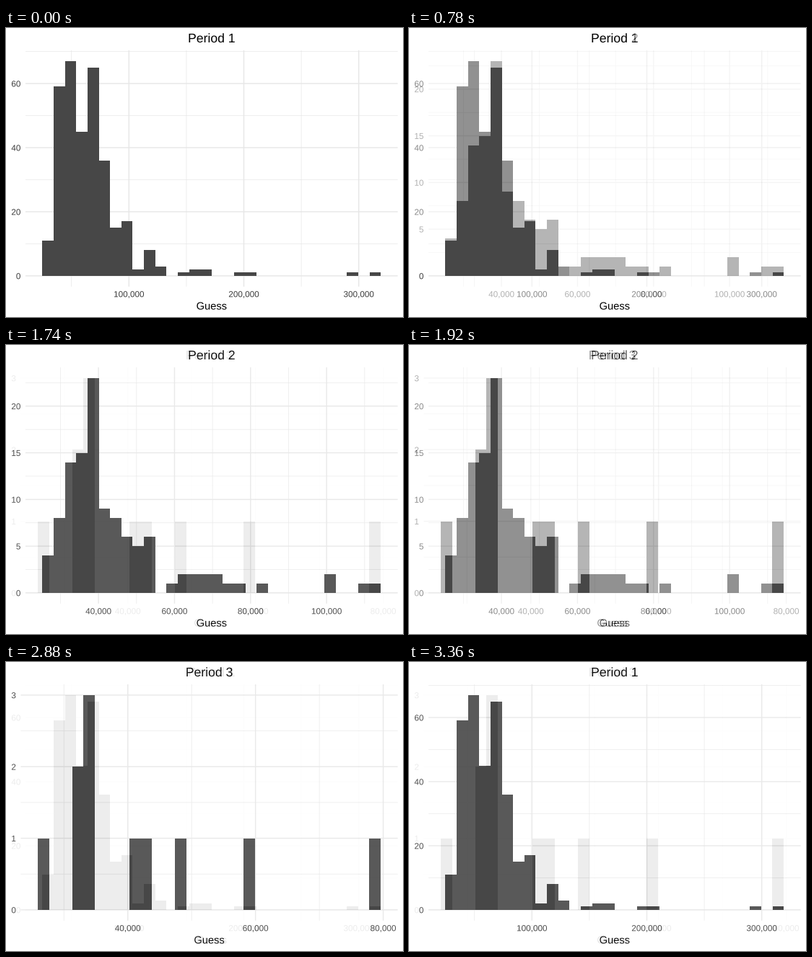
Recreate the animation shown at these times as a matplotlib script. Size 550 px wide and 401 px high, loop 3.42 s.

```python
import matplotlib.pyplot as plt
import numpy as np
from matplotlib.animation import FuncAnimation
from matplotlib.patches import PathPatch
from matplotlib.textpath import TextPath
from matplotlib.transforms import Affine2D

WIDTH, HEIGHT, DPI = 550, 401, 96
TOP, BOTTOM, RIGHT = 31.0, 358.8, 542.67
BASE, PEAK = 343.9, 45.9  # y of zero and of the tallest bar
BINS = 30
BAR, GRID, LABEL = "#474747", "#e7e7e7", "#3c3c3c"
STEP_MS, HOLD, FADE = 60, 9, 10

# Advance widths in em; every other glyph used is 0.556
ADVANCE = {",": .278, " ": .278, "P": .667, "r": .333,
           "i": .222, "G": .778, "s": .5}

# Bars as {bin: count}; x ticks as (first px, gap px, first value, gap value)
PERIODS = [
    dict(title="Period 1", left=26.98, xticks=(170.3, 159.2, 100000, 100000),
         ygap=20,
         bars=dict(enumerate([11, 59, 67, 45, 65, 36, 15, 17, 2, 8, 3]))
         | {12: 1, 13: 2, 14: 2, 17: 1, 18: 1, 27: 1, 29: 1}),
    dict(title="Period 2", left=26.98, xticks=(128.1, 105.35, 40000, 20000),
         ygap=5,
         bars=dict(enumerate([4, 8, 14, 15, 23, 9, 8, 6, 5, 6]))
         | {11: 1, 12: 2, 13: 2, 14: 2, 15: 2, 16: 1, 17: 1, 19: 1,
            25: 2, 28: 1, 29: 1}),
    dict(title="Period 3", left=20.46, xticks=(168.7, 176.95, 40000, 20000),
         ygap=1,
         bars={0: 1, 3: 2, 4: 3, 8: 1, 9: 1, 12: 1, 18: 1, 29: 1}),
]

fig = plt.figure(figsize=(WIDTH / DPI, HEIGHT / DPI), dpi=DPI,
                 facecolor="white")


def put_text(ax, x, y, text, points, color, align=0.5):
    """Draw text as outlines, so it keeps its subpixel place; y is the baseline."""
    size = points * DPI / 72
    width = sum(ADVANCE.get(c, .556) for c in text) * size
    path = TextPath((0, 0), text, size=size, prop={"family": "Liberation Sans"})
    place = Affine2D().scale(1, -1).translate(x - align * width, y)
    ax.add_patch(PathPatch(place.transform_path(path), color=color, lw=0,
                           snap=False, zorder=4))


def grid_lines(ax, left, xs, ys, width):
    style = dict(color=GRID, lw=width, solid_capstyle="butt", snap=False,
                 zorder=1)
    for x in xs:
        if left < x < RIGHT:
            ax.plot([x, x], [TOP, BOTTOM], **style)
    for y in ys:
        if TOP < y < BOTTOM:
            ax.plot([left, RIGHT], [y, y], **style)


def draw_histogram(ax, title, left, xticks, ygap, bars):
    x0, dx, value, dvalue = xticks
    counts = np.array([bars.get(i, 0) for i in range(BINS)])
    unit = (BASE - PEAK) / counts.max()
    steps = np.arange(6)
    xs = x0 + steps * dx
    ys = BASE - steps * ygap * unit

    grid_lines(ax, left, xs - dx / 2, ys - ygap * unit / 2, 0.53)
    grid_lines(ax, left, xs, ys, 1.07)

    pad = (RIGHT - left) / 22
    edges = np.linspace(left + pad, RIGHT - pad, BINS + 1)
    ax.stairs(BASE - counts * unit, edges, baseline=BASE, fill=True,
              color=BAR, lw=0, snap=True, zorder=3)

    for k, (x, y) in enumerate(zip(xs, ys)):
        if x < RIGHT:
            put_text(ax, x, 373.3, f"{value + k * dvalue:,}", 8.8, LABEL)
        if y > TOP:
            put_text(ax, left - 6.6, y + 4.4, str(k * ygap), 8.8, LABEL, 1)

    middle = (left + RIGHT) / 2
    put_text(ax, middle, 20, title, 13.2, "black")
    put_text(ax, middle, 390.6, "Guess", 11, "black")


def render(period):
    """Draw one histogram and return it as a float RGB array."""
    fig.clear()
    ax = fig.add_axes([0, 0, 1, 1])
    draw_histogram(ax, **period)
    ax.set(xlim=(0, WIDTH), ylim=(HEIGHT, 0))
    ax.axis("off")
    fig.canvas.draw()
    return np.asarray(fig.canvas.buffer_rgba())[..., :3].astype(float)


plots = [render(p) for p in PERIODS]
fig.clear()
stage = fig.figimage(plots[0].astype(np.uint8))


def update(frame):
    index, step = divmod(frame, HOLD + FADE)
    mix = max(0, step - HOLD) / FADE
    old, new = plots[index], plots[(index + 1) % len(plots)]
    stage.set_data(np.rint(old + (new - old) * mix).astype(np.uint8))
    return [stage]


anim = FuncAnimation(fig, update, frames=len(plots) * (HOLD + FADE),
                     interval=STEP_MS, repeat=True, repeat_delay=0)
plt.show()
```
